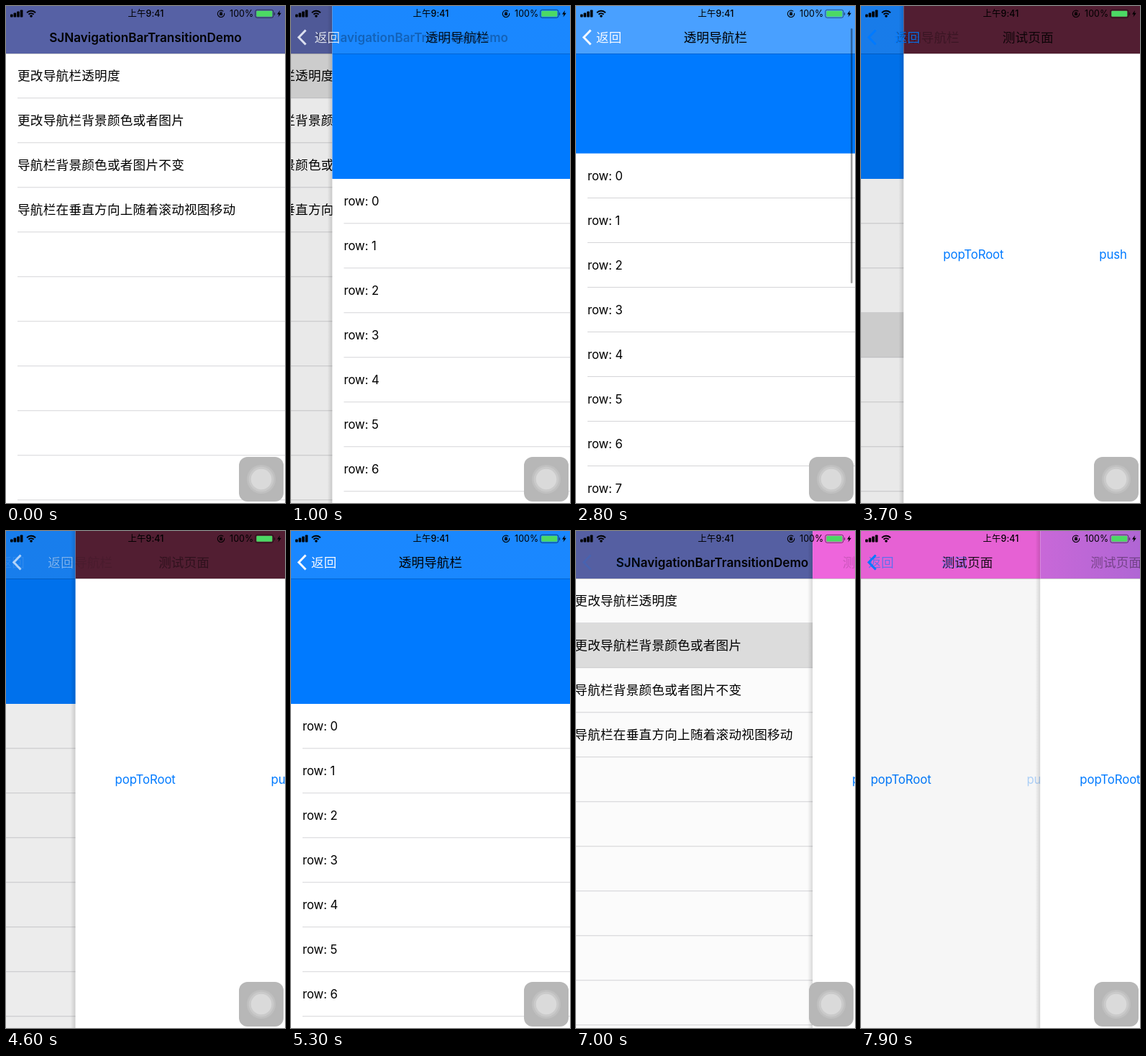
Recreate the animation shown at these times as an HTML page with a canvas. Size 388 px wide and 690 px high, loop 8 s.

```html
<!DOCTYPE html>
<html lang="zh">
<head>
<meta charset="utf-8">
<title>Navigation transitions</title>
<style>
html, body { margin: 0; width: 100%; height: 100%; overflow: hidden; background: #fff; }
canvas { display: block; width: 100vw; height: 100vh; }
</style>
</head>
<body>
<canvas id="stage"></canvas>
<script>
const W = 388, H = 690, BAR = 66, ROW = 62, LOOP = 8000;
const BLUE = '#007aff';
const FONT = 'Inter, "Noto Sans CJK SC", "Noto Sans CJK", sans-serif';
const canvas = document.getElementById('stage');
const ctx = canvas.getContext('2d');
const scale = window.devicePixelRatio || 1;
canvas.width = W * scale;
canvas.height = H * scale;

const menu = ['更改导航栏透明度', '更改导航栏背景颜色或者图片', '导航栏背景颜色或者图片不变', '导航栏在垂直方向上随着滚动视图移动'];
const test = (...bar) => ({ title: '测试页面', tint: BLUE, back: true, bar, draw: drawTest });
const root = { title: 'SJNavigationBarTransitionDemo', tint: BLUE, back: false, bar: ['#5661a5'], draw: drawMenu };
const clear = { title: '透明导航栏', tint: '#f4f8ff', back: true, draw: drawScroll };
const maroon = test('#521e32');
const pink = test('#ee65dc');
const purple = test('#c868d8', '#8562cd');

const moves = [
  { at: 750, low: root, up: clear },
  { at: 3453, low: clear, up: maroon },
  { at: 4530, low: clear, up: maroon, pop: true },
  { at: 6034, low: root, up: clear, pop: true },
  { at: 6950, low: root, up: pink },
  { at: 7808, low: pink, up: purple }
];
const presses = [
  { from: 400, to: 1500, page: root, item: 0 },
  { from: 3200, to: 4400, page: clear, item: 3 },
  { from: 6750, to: 7650, page: root, item: 1 },
  { from: 7650, to: 8000, page: pink, item: 0 }
];
const scrollSteps = [[1750, 0], [1900, 10], [2100, 80], [2350, 175], [2500, 160], [2650, 95], [2800, 35.5], [3000, 0]];

const clamp = v => Math.max(0, Math.min(1, v));

function tween(steps, t) {
  if (t <= steps[0][0]) return steps[0][1];
  for (let i = 1; i < steps.length; i++) {
    const [t0, a] = steps[i - 1], [t1, b] = steps[i];
    if (t <= t1) return a + (b - a) * (t - t0) / (t1 - t0);
  }
  return steps[steps.length - 1][1];
}

// Critically damped spring from 0 to 1
function spring(ms) {
  if (ms <= 0) return 0;
  const a = ms * 0.0135, rest = (1 + a) * Math.exp(-a);
  return rest < 0.0015 ? 1 : 1 - rest;
}

const pressed = (page, t) => {
  const hit = presses.find(p => p.page === page && t >= p.from && t < p.to);
  return hit ? hit.item : -1;
};

function rect(x, y, w, h, color) {
  ctx.fillStyle = color;
  ctx.fillRect(x, y, w, h);
}

function roundRect(x, y, w, h, r, color) {
  ctx.fillStyle = color;
  ctx.beginPath();
  ctx.roundRect(x, y, w, h, r);
  ctx.fill();
}

function disc(x, y, r, color) {
  ctx.fillStyle = color;
  ctx.beginPath();
  ctx.arc(x, y, r, 0, 7);
  ctx.fill();
}

function text(str, x, y, { color = '#000', size = 16.8, weight = 400, gap = -0.1, alpha = 1 } = {}) {
  ctx.save();
  ctx.globalAlpha = clamp(alpha);
  ctx.font = `${weight} ${size}px ${FONT}`;
  ctx.letterSpacing = gap + 'px';
  ctx.fillStyle = color;
  ctx.textBaseline = 'alphabetic';
  ctx.fillText(str, x, y);
  ctx.restore();
}

const cjk = { size: 17.6, gap: 0.25 };
const titleStyle = page => page === root
  ? { size: 17.1, weight: 600, gap: 0 }
  : { size: 17.6, weight: 500, gap: 0.1 };

function titleWidth(page) {
  const s = titleStyle(page);
  ctx.save();
  ctx.font = `${s.weight} ${s.size}px ${FONT}`;
  ctx.letterSpacing = s.gap + 'px';
  const w = ctx.measureText(page.title).width;
  ctx.restore();
  return w;
}

function drawBar(colors) {
  const fill = ctx.createLinearGradient(0, 0, W, 0);
  colors.forEach((c, i) => fill.addColorStop(colors.length > 1 ? i / (colors.length - 1) : 0, c));
  rect(0, 0, W, BAR, fill);
  rect(0, BAR, W, 0.5, 'rgba(0,0,0,.35)');
}

function drawMenu(page, t) {
  rect(0, 0, W, H, '#fff');
  const hit = pressed(page, t);
  for (let i = 0; i < 10; i++) {
    const y = BAR + i * ROW;
    if (i === hit) rect(0, y, W, ROW, '#dfdfdf');
    if (menu[i]) text(menu[i], 16, y + 37, cjk);
    rect(16, y + ROW - 0.5, W, 0.7, '#c4c4c8');
  }
  drawBar(page.bar);
}

function drawScroll(page, t) {
  const offset = tween(scrollSteps, t), top = 240 - offset;
  const hit = pressed(page, t);
  rect(0, 0, W, H, '#fff');
  rect(0, 0, W, top, BLUE);
  for (let i = 0; top + i * ROW < H; i++) {
    const y = top + i * ROW;
    if (i === hit) rect(0, y, W, ROW, '#dfdfdf');
    text('row: ' + i, 16, y + 37);
    rect(16, y + ROW - 0.5, W, 0.7, '#c4c4c8');
  }
  drawBar([`rgba(255,255,255,${clamp(0.1 + 0.0053 * offset)})`]);
  const thumb = 0.38 * clamp((t - 1700) / 100) * clamp((3200 - t) / 200);
  if (thumb > 0) roundRect(382, 13 + 0.51 * offset, 2.6, 354, 1.3, `rgba(0,0,0,${thumb})`);
}

function drawTest(page, t) {
  rect(0, 0, W, H, '#fff');
  text('popToRoot', 55, 351, { color: BLUE });
  text('push', 272, 351, { color: BLUE, alpha: pressed(page, t) < 0 ? 1 : 0.3 });
  drawBar(page.bar);
}

function drawPage(page, x, t) {
  ctx.save();
  ctx.translate(x, 0);
  page.draw(page, t);
  ctx.restore();
}

function chevron(color, alpha) {
  ctx.save();
  ctx.globalAlpha = clamp(alpha);
  ctx.strokeStyle = color;
  ctx.lineWidth = 3;
  ctx.beginPath();
  ctx.moveTo(20.5, 33.5);
  ctx.lineTo(10.8, 43.5);
  ctx.lineTo(20.5, 53.5);
  ctx.stroke();
  ctx.restore();
}

// Titles and back labels slide and cross-fade; q is how far the upper page covers the lower
function drawNavItems({ low, up, pop }, q) {
  const popping = pop && q > 0 && q < 1;
  const tint = popping || q === 0 ? low.tint : up.tint;
  const lowLeft = 194 - titleWidth(low) / 2;
  const upLeft = 194 - titleWidth(up) / 2;
  if (q < 1) {
    const early = 1 - 1.2 * q;
    text(low.title, lowLeft + (30 - lowLeft) * q, 50, { ...titleStyle(low), alpha: popping ? early : 1 - q * q });
    if (low.back) text('返回', 28 - 50 * q, 50, { ...cjk, color: low.tint, alpha: early });
  }
  if (q > 0) {
    const fade = popping ? Math.min(q, 0.42) : q;
    text(up.title, upLeft + (pop ? 215 : 250) * (1 - q), 50, { ...titleStyle(up), alpha: fade });
    if (up.back) text('返回', 28 + (lowLeft - 28) * (1 - q), 50, { ...cjk, color: tint, alpha: popping ? q * 0.6 : q });
  }
  chevron(tint, low.back ? (popping ? 1 - 0.4 * q : 1) : q);
}

function drawStatus() {
  [4, 6, 8, 10].forEach((h, i) => roundRect(6 + i * 4.6, 15.5 - h, 3.6, h, 0.8, '#000'));
  ctx.strokeStyle = '#000';
  ctx.lineWidth = 2;
  for (const r of [4.8, 8.2]) {
    ctx.beginPath();
    ctx.arc(35, 15, r, -Math.PI * 0.76, -Math.PI * 0.24);
    ctx.stroke();
  }
  disc(35, 14, 1.8, '#000');
  text('上午9:41', 169.5, 15, { size: 12.4, weight: 500, gap: 0.1 });

  ctx.lineWidth = 1.1;
  ctx.beginPath();
  ctx.arc(299, 10.8, 4.7, -0.2, Math.PI * 1.75);
  ctx.stroke();
  rect(297, 10, 4, 3, '#000');
  ctx.beginPath();
  ctx.arc(299, 10, 1.4, Math.PI, 0);
  ctx.stroke();
  text('100%', 311, 15, { size: 12.4, gap: 0.1 });

  ctx.strokeStyle = 'rgba(0,0,0,.5)';
  ctx.lineWidth = 1;
  ctx.beginPath();
  ctx.roundRect(346.8, 5.3, 25, 11, 2.5);
  ctx.stroke();
  roundRect(348.3, 6.8, 22, 8, 1.2, '#4cd964');
  roundRect(372.8, 9, 1.4, 4, 0.7, 'rgba(0,0,0,.5)');
  ctx.fillStyle = '#000';
  ctx.beginPath();
  [[381, 6], [377, 11.5], [379.5, 11.5], [378.5, 15.5], [382.8, 9.8], [380.2, 9.8]].forEach(p => ctx.lineTo(...p));
  ctx.fill();
}

function drawTouchButton() {
  roundRect(324, 626, 62, 62, 12, '#b7b7b7');
  disc(355, 657, 20, '#c0c0c0');
  disc(355, 657, 17.3, '#cacaca');
  disc(355, 657, 14.3, '#dadada');
}

function render(t) {
  ctx.setTransform(canvas.width / W, 0, 0, canvas.height / H, 0, 0);
  const move = moves.filter(m => m.at <= t).pop() || moves[0];
  const done = spring(t - move.at);
  const q = move.pop ? 1 - done : done;
  const x = W * (1 - q);
  if (q < 1) {
    drawPage(move.low, -0.3 * W * q, t);
    rect(0, 0, W, H, `rgba(0,0,0,${0.1 * q})`);
  }
  if (q > 0) {
    if (q < 1) {
      const shade = ctx.createLinearGradient(x - 7, 0, x, 0);
      shade.addColorStop(0, 'rgba(0,0,0,0)');
      shade.addColorStop(1, 'rgba(0,0,0,.14)');
      rect(x - 7, 0, 7, H, shade);
    }
    drawPage(move.up, x, t);
  }
  drawNavItems(move, q);
  drawStatus();
  drawTouchButton();
}

const start = performance.now();
function tick() {
  render((performance.now() - start) % LOOP);
  requestAnimationFrame(tick);
}
tick();
</script>
</body>
</html>
```
